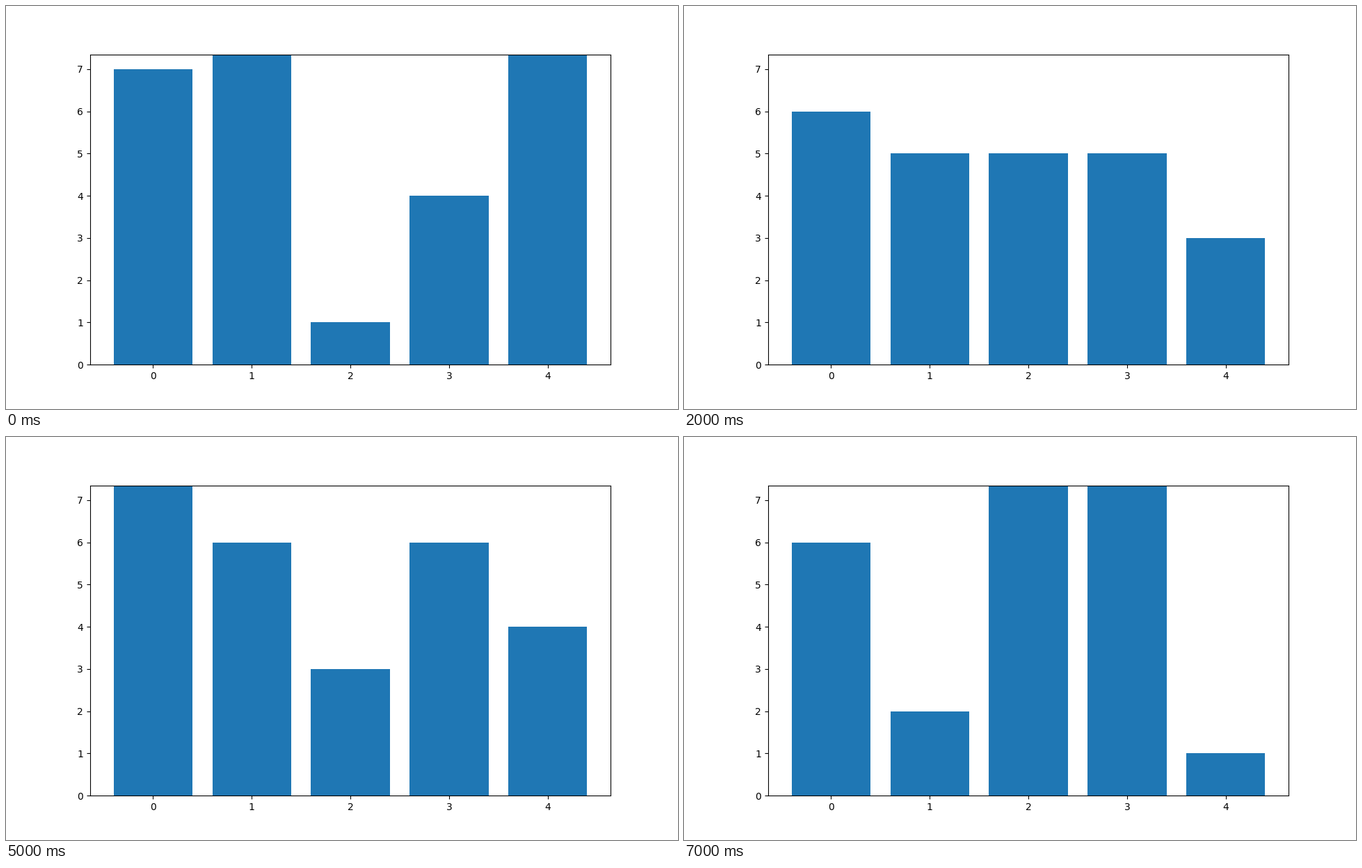
A matplotlib script for the animation above (8000 ms loop, 966 by 580 pixels).

```python
import matplotlib.pyplot as plt
from matplotlib.animation import FuncAnimation

DPI = 100
STEP_MS = 1000

# One row of bar heights per second; 8 runs past the top of the axes.
HEIGHTS = [
    (7, 8, 1, 4, 8),
    (4, 2, 8, 1, 7),
    (6, 5, 5, 5, 3),
    (4, 5, 8, 5, 2),
    (5, 2, 6, 8, 1),
    (8, 6, 3, 6, 4),
    (6, 6, 6, 7, 4),
    (6, 2, 8, 8, 1),
]

fig, ax = plt.subplots(figsize=(966 / DPI, 580 / DPI), dpi=DPI)
bars = ax.bar(range(5), HEIGHTS[0], color="#1f77b4")
ax.set_ylim(0, 7.35)


def update(step):
    for bar, height in zip(bars, HEIGHTS[step]):
        bar.set_height(height)
    return bars.patches


anim = FuncAnimation(fig, update, frames=len(HEIGHTS), interval=STEP_MS,
                     repeat=True, repeat_delay=0, blit=False)

plt.show()
```
